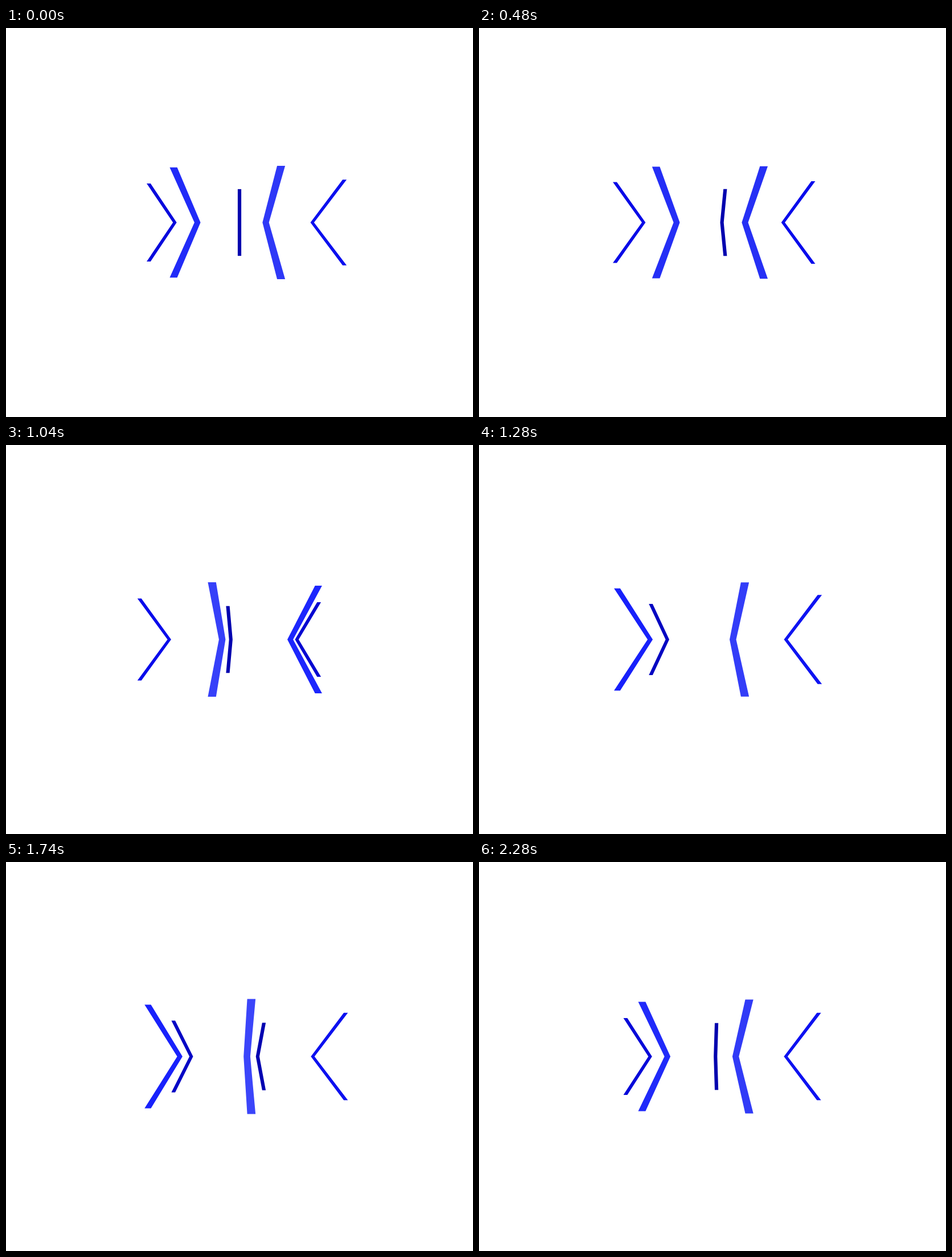
An HTML page for the animation above (2.3 s loop, 820 by 683 pixels).

```html
<!DOCTYPE html>
<html lang="en">
<head>
<meta charset="utf-8">
<title>Turning chevrons</title>
<style>
  html, body { margin: 0; width: 100%; height: 100%; overflow: hidden; background: #fff; }
  svg { display: block; width: 820px; height: 683px; }
</style>
</head>
<body>
<svg id="stage" viewBox="0 0 820 683"></svg>
<script>
const LOOP = 2300, STEP = 20, COUNT = 5;
const CX = 410, CY = 341.5;
const FOCAL = 683, DIST = 3.75;   // perspective, outer radius = 1
const INNER = 0.695, HEIGHT = 278.4;
const SPACING = 1.2;              // radians between neighbours
const LAG = [0.16, 0.135, -0.012, -0.012]; // harmonics that slow the front

const stage = document.getElementById('stage');
const paths = Array.from({ length: COUNT }, () =>
  stage.appendChild(document.createElementNS('http://www.w3.org/2000/svg', 'path')));

// Colour by depth: -1 is far, 1 is near
const SHADES = [
  [-1, 2, 2, 174],
  [-0.1, 8, 10, 236],
  [0.78, 26, 36, 254],
  [0.93, 38, 48, 245],
  [1, 60, 70, 250]
];

function shade(depth) {
  let i = 1;
  while (i < SHADES.length - 1 && depth > SHADES[i][0]) i++;
  const a = SHADES[i - 1], b = SHADES[i];
  const k = (depth - a[0]) / (b[0] - a[0]);
  const mix = n => Math.round(a[n] + (b[n] - a[n]) * k);
  return `rgb(${mix(1)},${mix(2)},${mix(3)})`;
}

const project = (radius, angle) =>
  CX + FOCAL * radius * Math.sin(angle) / (DIST - radius * Math.cos(angle));

function chevron(turn) {
  const angle = LAG.reduce((sum, k, i) => sum - k * Math.sin((i + 1) * turn), turn);
  const depth = Math.cos(angle);
  const tip = project(1, angle), apex = project(INNER, angle);
  const h = HEIGHT / (DIST - depth);
  const wide = depth > 0 ? 7 + 7.6 * depth ** 1.6 : 7 - 0.8 * depth * depth;
  const t = wide / 2, a = t * (0.9 - 0.1 * depth);
  const points = [
    [tip - t, CY - h], [tip + t, CY - h], [apex + a, CY],
    [tip + t, CY + h], [tip - t, CY + h], [apex - a, CY]
  ];
  const d = 'M' + points.map(p => p.map(v => v.toFixed(2)).join(' ')).join('L') + 'Z';
  return { d, depth };
}

function draw(ms) {
  const spin = Math.PI * (1 + 2 * ms / LOOP);
  const items = paths.map((_, i) => chevron(spin + i * SPACING));
  items.sort((p, q) => p.depth - q.depth);
  items.forEach((item, i) => {
    paths[i].setAttribute('d', item.d);
    paths[i].setAttribute('fill', shade(item.depth));
  });
}

const start = performance.now();
function tick() {
  const ms = (performance.now() - start) % LOOP;
  draw(Math.floor(ms / STEP) * STEP);
  requestAnimationFrame(tick);
}
draw(0);
requestAnimationFrame(tick);
</script>
</body>
</html>
```
